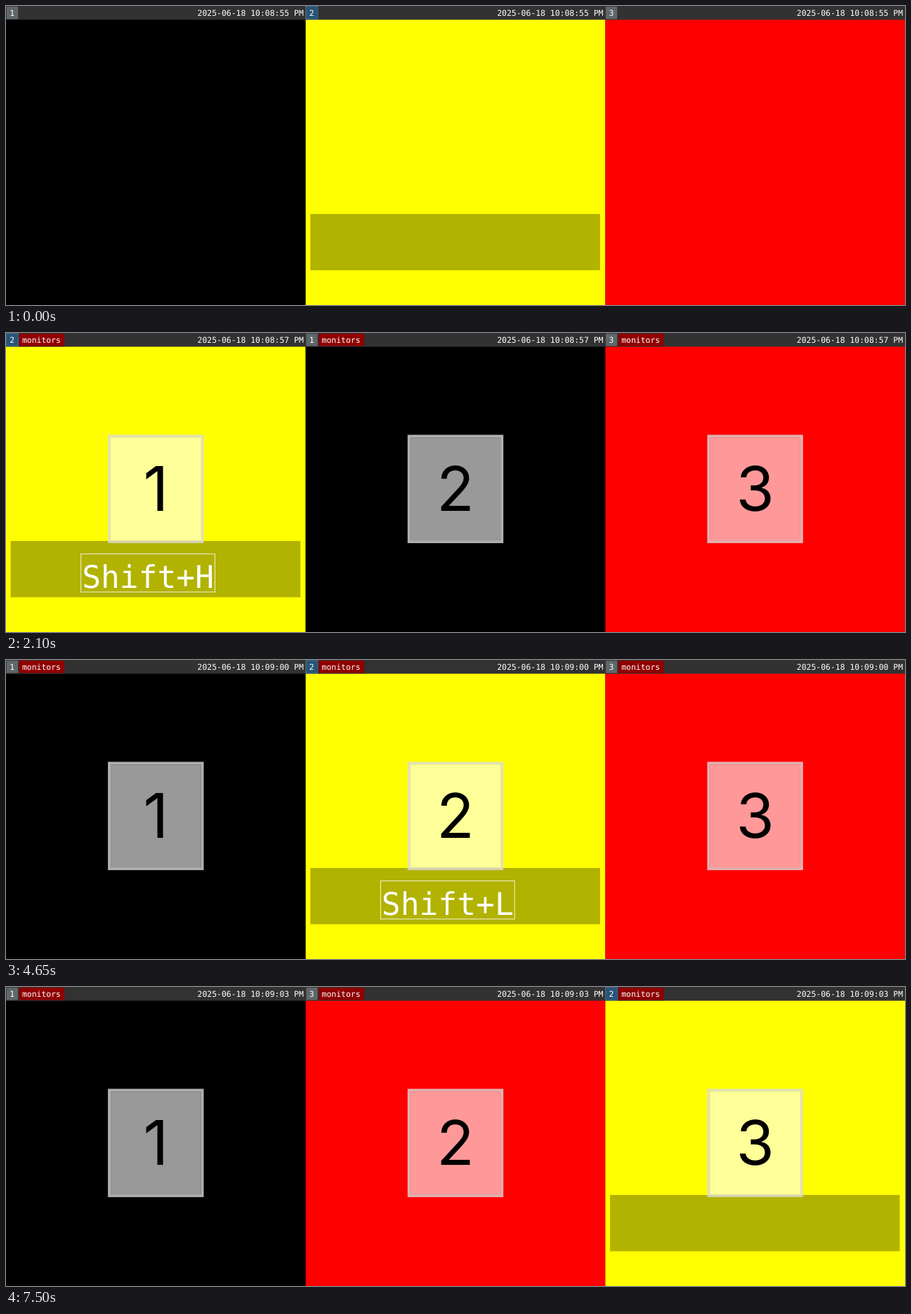
These frames come from a looping animation (1280x427 px, 8000 ms). An HTML page:

```html
<!DOCTYPE html>
<html lang="en">
<head>
<meta charset="utf-8">
<title>Swapping workspaces between monitors</title>
<style>
  html, body { margin: 0; width: 100%; height: 100%; overflow: hidden; background: #000; }
  svg { display: block; width: 1280px; height: 427px; }
  text { text-rendering: geometricPrecision; white-space: pre; fill: #fff; }
  .bar { font: 11.43px "DejaVu Sans Mono", monospace; }
  .key { font: 44.6px "DejaVu Sans Mono", monospace; text-anchor: middle; }
  .digit { font: 88px Inter, sans-serif; text-anchor: middle; fill: #000; }
  .mid { text-anchor: middle; }
</style>
</head>
<body>
<svg id="stage" viewBox="0 0 1280 427">
  <defs><clipPath id="band"><rect x="6.67" y="297" width="412.5" height="80.4"/></clipPath></defs>
</svg>
<script>
const LOOP = 8000;
const PANEL = 1280 / 3;
const COLORS = { 1: '#000', 2: '#ff0', 3: '#f00' };
const FOCUSED = 2;
const MODE_START = 750;
const CLOCK_TICKS = [750, 1650, 2700, 3750, 4650, 5550, 6600, 7500];
const LAYOUTS = [
  { at: 0, order: [1, 2, 3] },
  { at: 2100, order: [2, 1, 3] },
  { at: 4350, order: [1, 2, 3] },
  { at: 4950, order: [1, 3, 2] }
];
const KEYS = [
  { at: 0, keys: [] },
  { at: 750, keys: ['Super+m'] },
  { at: 1500, keys: [] },
  { at: 2100, keys: ['Shift+H'] },
  { at: 3150, keys: [] },
  { at: 4350, keys: ['Shift+L'] },
  { at: 4950, keys: ['Shift+L', 'Shift+L'] },
  { at: 5850, keys: [] }
];

const stage = document.getElementById('stage');

function add(parent, tag, attrs = {}, text = '') {
  const node = document.createElementNS('http://www.w3.org/2000/svg', tag);
  set(node, attrs);
  node.textContent = text;
  return parent.appendChild(node);
}

function set(node, attrs) {
  for (const name in attrs) node.setAttribute(name, attrs[name]);
}

function rect(parent, x, y, width, height, attrs) {
  return add(parent, 'rect', { x, y, width, height, ...attrs });
}

const show = (node, visible) => set(node, { display: visible ? 'inline' : 'none' });
const current = (steps, time) => steps.filter(step => step.at <= time).pop();

function makeMonitor(index) {
  const root = add(stage, 'g', { transform: `translate(${index * PANEL} 0)` });
  const wall = rect(root, 0, 0, PANEL, 427);
  rect(root, 0, 0, PANEL, 19.6, { fill: '#323232' });
  const button = rect(root, 0.35, 0.6, 17, 18.4, { 'stroke-width': 0.7 });
  const workspace = add(root, 'text', { class: 'bar mid', x: 8.6, y: 13.7 });
  const clock = add(root, 'text', { class: 'bar', x: 272.5, y: 13.7 });

  const osd = add(root, 'g');
  rect(osd, 6.67, 297, 412.5, 80.4, { 'fill-opacity': 0.3 });
  const keys = add(osd, 'g', { 'clip-path': 'url(#band)' });

  const mode = add(root, 'g');
  rect(mode, 18.35, 0.6, 65.3, 18.4, { fill: '#900000', stroke: '#2f343a', 'stroke-width': 0.7 });
  add(mode, 'text', { class: 'bar mid', x: 50.4, y: 13.7 }, 'monitors');
  rect(mode, 149.1, 149.4, 128.4, 146.7, { fill: '#fff', 'fill-opacity': 0.6 });
  rect(mode, 147.1, 147.4, 132.4, 150.7,
    { fill: 'none', stroke: '#ddd', 'stroke-opacity': 0.8, 'stroke-width': 4 });
  add(mode, 'text', { class: 'digit', x: 213.3, y: 254 }, index + 1);

  return { wall, button, workspace, clock, osd, keys, mode };
}

// One key is centred in the band; more keys push older ones out to the left.
function drawKeys(parent, labels) {
  const signature = labels.join();
  if (parent.dataset.labels === signature) return;
  parent.dataset.labels = signature;
  parent.replaceChildren();
  labels.forEach((label, i) => {
    const center = labels.length === 1 ? 202.1 : 302.1 - 212.2 * (labels.length - 1 - i);
    rect(parent, center - 95.4, 315.4, 190.8, 54.5,
      { fill: 'none', stroke: '#fff', 'stroke-opacity': 0.85 });
    add(parent, 'text', { class: 'key', x: center, y: 364 }, label);
  });
}

function clockText(time) {
  const seconds = 55 + CLOCK_TICKS.filter(tick => tick <= time).length;
  const pad = n => String(n).padStart(2, '0');
  return `2025-06-18 10:${pad(8 + Math.floor(seconds / 60))}:${pad(seconds % 60)} PM`;
}

const monitors = [0, 1, 2].map(makeMonitor);

function render(time) {
  const { order } = current(LAYOUTS, time);
  const { keys } = current(KEYS, time);
  monitors.forEach((monitor, i) => {
    const id = order[i];
    const focused = id === FOCUSED;
    set(monitor.wall, { fill: COLORS[id] });
    set(monitor.button, focused
      ? { fill: '#285577', stroke: '#4c7899' }
      : { fill: '#5f676a', stroke: '#333' });
    monitor.workspace.textContent = id;
    monitor.clock.textContent = clockText(time);
    show(monitor.mode, time >= MODE_START);
    show(monitor.osd, focused);
    drawKeys(monitor.keys, focused ? keys : []);
  });
}

const start = performance.now();
function tick() {
  render((performance.now() - start) % LOOP);
  requestAnimationFrame(tick);
}
tick();
</script>
</body>
</html>
```
